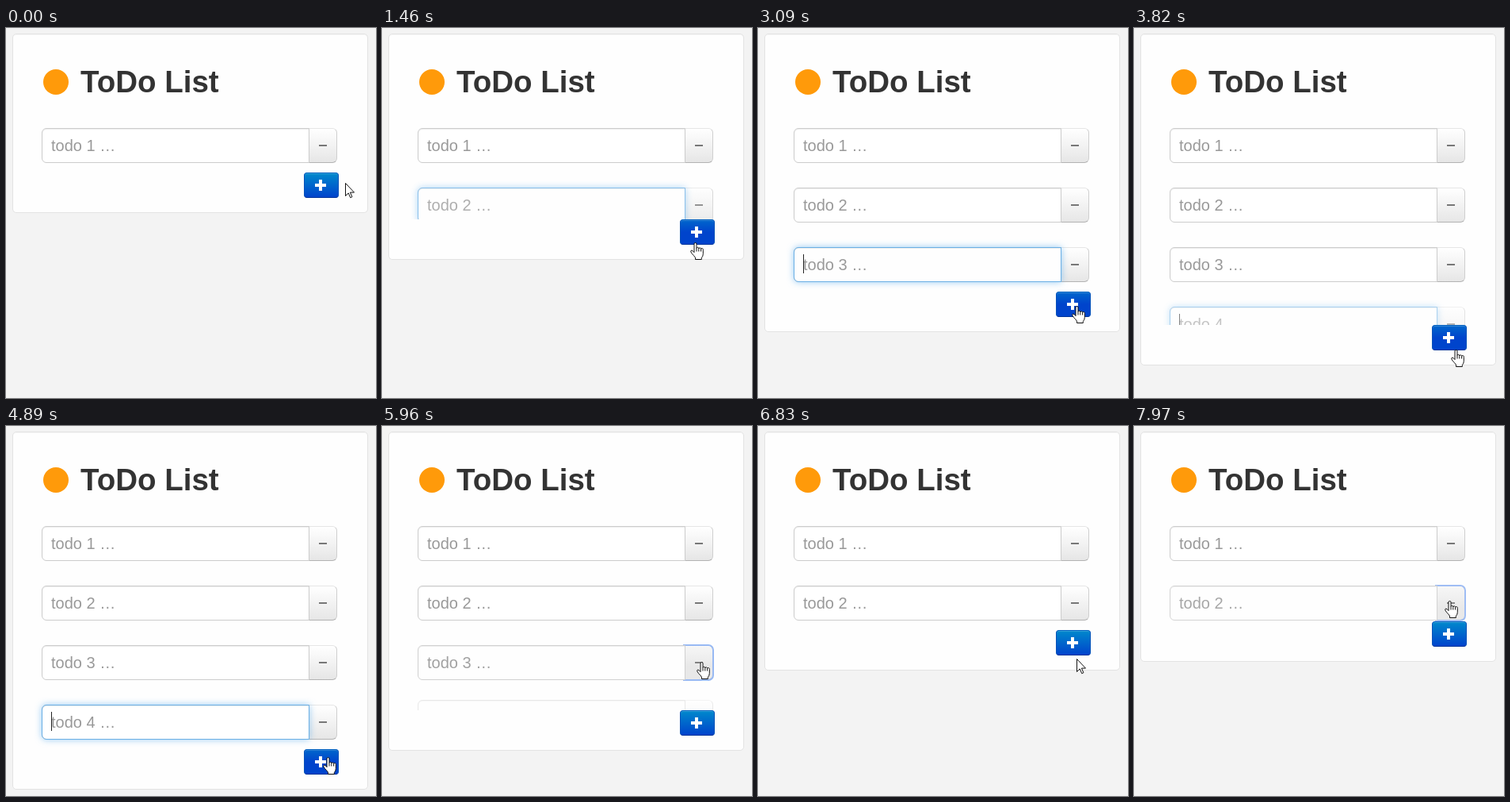
Recreate the animation shown at these times as an HTML page. Size 467 px wide and 466 px high, loop 8000 ms.

```html
<!DOCTYPE html>
<html lang="en">
<head>
<meta charset="utf-8">
<title>ToDo List</title>
<style>
  html, body { margin: 0; width: 100%; height: 100%; overflow: hidden; background: #f3f3f3; }
  body { position: relative; font-family: "Liberation Sans", Arial, sans-serif; }
  body *, svg { position: absolute; box-sizing: border-box; }
  .card {
    left: 8px; top: 7px; width: 449px;
    background: #fefefe; border: 1px solid #e3e3e3; border-radius: 5px;
    box-shadow: inset 0 1px 1px rgba(0,0,0,.04);
  }
  .logo { left: 47px; top: 52px; width: 32px; height: 32px; border-radius: 50%; background: #ff9a0a; }
  h1 {
    left: 94px; top: 46px; margin: 0; white-space: nowrap;
    font-size: 38.5px; line-height: 44px; color: #333;
  }
  .row { left: 30px; width: 407px; overflow: hidden; }
  .field {
    left: 15px; top: 19px; width: 338px; height: 44px; padding-left: 11px;
    background: #fff; border: 1px solid #ccc; border-radius: 6px 0 0 6px;
    box-shadow: inset 0 1px 1px rgba(0,0,0,.075);
    font-size: 20px; line-height: 42px; color: #999; white-space: pre;
  }
  .glow {
    inset: -1px; border: 1px solid rgba(82,168,236,.8); border-radius: inherit;
    box-shadow: 0 0 8px rgba(82,168,236,.6);
  }
  .caret { left: 11px; top: 8px; width: 1px; height: 24px; background: #222; }
  .btn { background-repeat: no-repeat; }
  .btn.hover { background-position: 0 -15px; }
  .btn.active { background-image: none; box-shadow: inset 0 2px 4px rgba(0,0,0,.15); }
  .minus {
    left: 351px; top: 19px; width: 37px; height: 44px;
    background-color: #e6e6e6; background-image: linear-gradient(#fff, #e6e6e6);
    border: 1px solid; border-color: #e6e6e6 #cfcfcf #b3b3b3 #bbb; border-radius: 0 6px 6px 0;
    box-shadow: inset 0 1px 0 rgba(255,255,255,.2);
  }
  .minus.active { background-color: #d9d9d9; }
  .minus.ring { outline: 2px solid #8fb3f3; outline-offset: -1px; }
  .minus i { left: 13px; top: 20px; width: 10px; height: 2px; background: #777; }
  .plus {
    left: 376px; width: 44px; height: 32px;
    background-color: #04c; background-image: linear-gradient(#08c, #04c);
    border: 1px solid; border-color: #0060c0 #0050b8 #003399; border-radius: 4px;
    box-shadow: inset 0 1px 0 rgba(255,255,255,.2);
  }
  .plus.active { background-color: #003bb3; }
  .plus i { left: 13px; top: 13px; width: 14px; height: 4px; background: #fff; }
  .plus i + i { transform: rotate(90deg); }
  svg { left: 0; top: 0; overflow: visible; fill: #fff; stroke: #111; stroke-linejoin: round; }
</style>
</head>
<body>
<div class="card"></div>
<div class="logo"></div>
<h1>ToDo List</h1>
<div class="plus btn"><i></i><i></i></div>
<svg width="18" height="23">
  <path class="arrow" d="M.5.5v16l3.7-3.6 2.5 5.8 2.2-1-2.5-5.6h5.1z"/>
  <path class="hand" d="M-1 2a1.5 1.5 0 0 1 3 0v5.5a1.4 1.4 0 0 1 2.8.5 1.4 1.4 0 0 1 2.8.6 1.4 1.4 0 0 1 2.7.9v5q0 3-2 5v2H.5v-2.3q-2-2.9-3.9-4.5l-1.8-2.8q-.4-1.6 1-1.8 1.3 0 3.2 2.5zM2 7.5v4M4.8 8.2v3.3M7.6 8.8v2.7"/>
</svg>
<script>
const LOOP = 8000, FULL = 75, SLIDE = 1000, FADE = 200, BLINK = 530;
const LIST_TOP = 107;

// When each row opens, loses its text focus, takes the button ring and closes.
const ROWS = [
  { open: -SLIDE, shut: Infinity, ring: Infinity },
  { open: 975, blur: 2190, caretOff: 2030, shut: 7842, ring: 7842 },
  { open: 2190, blur: 3494, caretOff: 3330, shut: 5867, ring: 5867 },
  { open: 3494, blur: 5634, caretOff: 5430, shut: 5634, ring: 5634, ringOff: 5867 }
];

const PRESSES = [[800, 975], [2030, 2190], [3330, 3494], [5430, 5634], [5820, 5867], [7670, 7842]];

// Pointer stops: time, x, y.
const PATH = [
  [0, 428, 195], [380, 428, 195], [760, 398, 198], [1050, 398, 198],
  [1460, 395, 270], [1620, 396, 277], [2190, 396, 277],
  [2500, 399, 323], [2760, 402, 350], [3494, 402, 350],
  [3820, 406, 405], [4080, 406, 418], [4870, 406, 418],
  [5150, 403, 373], [5640, 403, 373], [5830, 403, 297],
  [6500, 403, 297], [6640, 402, 293], [6850, 402, 293],
  [7060, 402, 267], [7160, 410, 250], [7320, 398, 220], [LOOP, 398, 220]
];

const $ = s => document.querySelector(s);
const card = $('.card'), plus = $('.plus'), pointer = $('svg');
const arrow = $('.arrow'), hand = $('.hand');
const clamp = v => Math.min(1, Math.max(0, v));
const within = (v, a, b) => v >= a && v < b;

// The CSS "ease" curve, solved by bisection.
function ease(x) {
  if (x <= 0 || x >= 1) return clamp(x);
  const bez = (s, a, b) => 3 * (1 - s) * (1 - s) * s * a + 3 * (1 - s) * s * s * b + s ** 3;
  let lo = 0, hi = 1;
  for (let i = 0; i < 24; i++) {
    const mid = (lo + hi) / 2;
    if (bez(mid, .25, .25) < x) lo = mid; else hi = mid;
  }
  return bez(lo, .1, 1);
}

ROWS.forEach((row, i) => {
  const el = document.createElement('div');
  el.className = 'row';
  el.innerHTML = `<div class="minus btn"><i></i></div>
    <div class="field">todo ${i + 1} …<b class="glow"></b><b class="caret"></b></div>`;
  document.body.insertBefore(el, plus);
  row.el = el;
  for (const name of ['minus', 'glow', 'caret']) row[name] = el.querySelector('.' + name);
});

function pointerAt(t) {
  let i = 1;
  while (i < PATH.length - 1 && PATH[i][0] < t) i++;
  const [t0, x0, y0] = PATH[i - 1], [t1, x1, y1] = PATH[i];
  const p = clamp((t - t0) / (t1 - t0)), k = p * p * (3 - 2 * p);
  return [Math.round(x0 + (x1 - x0) * k), Math.round(y0 + (y1 - y0) * k)];
}

function setState(el, hover, pressed) {
  el.classList.toggle('hover', hover);
  el.classList.toggle('active', hover && pressed);
}

function draw(t) {
  const [px, py] = pointerAt(t);
  const pressed = PRESSES.some(([a, b]) => within(t, a, b));
  let y = LIST_TOP, overMinus = false;

  for (const row of ROWS) {
    const size = ease((t - row.open) / SLIDE) - ease((t - row.shut) / SLIDE);
    const top = Math.round(y);
    y += FULL * size;
    const bottom = Math.round(y);
    row.el.style.top = top + 'px';
    row.el.style.height = bottom - top + 'px';
    row.el.style.opacity = size;

    const hover = within(px, 381, 418) && within(py, top + 19, Math.min(top + 63, bottom));
    overMinus = overMinus || hover;
    setState(row.minus, hover, pressed);
    row.minus.classList.toggle('ring', within(t, row.ring, row.ringOff || Infinity));

    const age = t - row.open;
    const focusable = row.blur !== undefined;
    row.glow.style.opacity = focusable ? clamp(age / FADE) - clamp((t - row.blur) / FADE) : 0;
    const lit = Math.floor((age + BLINK - 350) / BLINK) % 2 === 0;
    row.caret.style.opacity = focusable && age >= 0 && t < row.caretOff && lit ? 1 : 0;
  }

  const plusTop = Math.round(y);
  const overPlus = within(px, 376, 420) && within(py, plusTop, plusTop + 32);
  plus.style.top = plusTop + 'px';
  card.style.height = plusTop + 44 + 'px';
  setState(plus, overPlus, pressed);

  const over = overPlus || overMinus;
  hand.style.display = over ? '' : 'none';
  arrow.style.display = over ? 'none' : '';
  pointer.style.transform = `translate(${px}px, ${py}px)`;
}

const start = performance.now();
function tick() {
  draw((performance.now() - start) % LOOP);
  requestAnimationFrame(tick);
}
tick();
</script>
</body>
</html>
```
